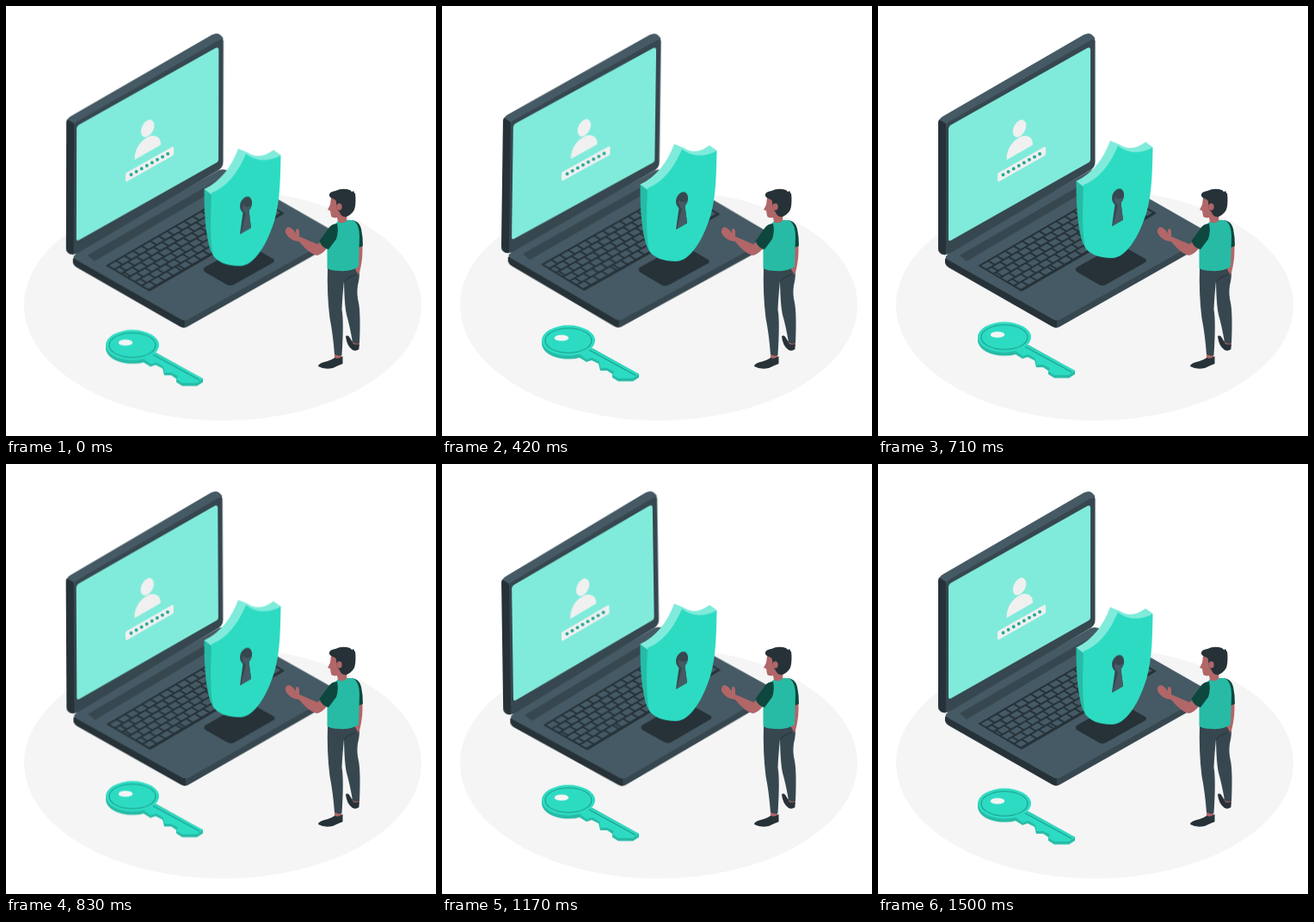
An HTML page without scripts that plays this animation: 500x500 px, repeating every 1.54 s.

```html
<!DOCTYPE html>
<html lang="en">
<head>
<meta charset="utf-8">
<title>Secure login</title>
<style>
  html, body { margin: 0; width: 100%; height: 100%; overflow: hidden; background: #fff; }
  svg { display: block; width: 100%; height: 100%; }

  .ink { fill: #263238; }
  .slate { fill: #37474f; }
  .steel { fill: #455a64; }
  .mint { fill: #80ebdb; }
  .teal { fill: #2ddbc3; }
  .shade { fill: #26bba6; }
  .pale { fill: #f0f0f0; }
  .skin { fill: #b16668; }
  .sleeve { fill: #0e473e; }
  .groove { fill: none; stroke: #1d9c89; stroke-width: 1.1; }
  .keys { fill: none; stroke: #455a64; stroke-width: 6; stroke-dasharray: 8 1.9; }
  .dots { fill: none; stroke: #25a894; stroke-width: 4; stroke-linecap: round; stroke-dasharray: 0 7; }

  .sway { transform-origin: 227px 203px; animation: sway 1540ms -50ms linear infinite; }
  .float { animation: float 1540ms -50ms linear infinite; }
  @keyframes sway {
    25% { transform: rotate(1deg); }
    75% { transform: rotate(-1deg); }
  }
  @keyframes float {
    50% { transform: translateY(-10px); }
  }
</style>
</head>
<body>
<svg viewBox="0 0 500 500">
  <ellipse cx="252" cy="347.800" rx="231" ry="134.200" fill="#f5f5f5"/>

  <g class="sway">
    <!-- base -->
    <path class="ink" d="M78 294V299Q79 302 82 304L203 373Q206 374.500 208 374V364L84 290Z"/>
    <path class="slate" d="M208 374Q210 374 213 372L382 276Q384 275 384 267L208 364Z"/>
    <path class="steel" d="M80 290L92 280L247 191Q254 188 261 193L382 262Q386 266 382 268.500L213 364Q208 367 203 364L81 295Q77 292.500 80 290Z"/>
    <path class="slate" d="M95 290L250 200L258 205L103 297Z"/>

    <!-- keyboard -->
    <g transform="matrix(1 -.58 1 .588 116 302)">
      <rect class="ink" width="157" height="51" rx="1"/>
      <g class="keys">
        <path d="M2 5H155M2 29H155"/>
        <path d="M2 13H155M2 37H155" stroke-dashoffset="4"/>
        <path d="M2 21H155" stroke-dashoffset="7"/>
        <path d="M2 45H42M44 45H88M90 45H155" stroke-dashoffset="1"/>
      </g>
    </g>
    <path class="ink" d="M231 304L277 278Q280 276 283 278L311 294Q313 296 311 298L265 324Q261 326 257 324L231 309Q229 306 231 304Z"/>

    <!-- lid -->
    <path class="steel" d="M70 138Q70 131 76 128L239 33.500Q247 29 252 37V181Q252 187 248 190L82 288Q76 291 72 287Q70 285 70 281Z"/>
    <path class="ink" d="M70 138Q70 134 71 132L79 137V289Q75 290 72 287Q70 285 70 281Z"/>
    <path class="slate" d="M79 141Q79 137 82 135L247 40Q251 38 252.500 40V181Q252.500 187 248 190L83 288Q79 290 79 286Z"/>
    <path class="mint" d="M82 143.500Q82 140 85 138.300L243 49Q247 47 247 51V178Q247 181 244 182.500L85 272.500Q82 274 82 271Z"/>

    <!-- login -->
    <ellipse class="pale" cx="164.500" cy="142.500" rx="6.800" ry="10.800" transform="rotate(27 164.500 142.500)"/>
    <path class="pale" d="M149.500 179C149 167 156 157 165 152.500C173 149 180 152 180 161.500Z"/>
    <path class="pale" d="M139 196Q139 194.500 141 193.500L193 164Q195 163 195 165V172Q195 173.500 193 174.500L141 204Q139 205 139 203Z"/>
    <path class="dots" d="M145.500 196.200L188.300 171.800"/>
  </g>

  <g class="float">
    <!-- shield -->
    <path class="shade" d="M230.500 213L243 213L262 302C249 299 240 294 236.500 281C231 259 230.500 236 230.500 213Z"/>
    <path class="mint" d="M230.500 213.500C250 204 262 188 270 166.500L281 171C291 178 302 175 311 168L319.500 174L300 185L239 220Z"/>
    <path class="teal" d="M239 218C257 211 270 194 279 172.500C291 182 307 182 319.500 174C319 198 319 226 312.500 249C304 277 289 303 272 303C256 303 246 298 241 291C237 272 238 240 239 218Z"/>
    <path class="slate" d="M275.500 241C271 237 271 230 275 225.500C279 220.500 285 221 286 228C286.500 232 285 236 282.500 238.500L285 258.500L272 266Z"/>
    <path class="steel" d="M279 242Q274 238 275 232Q281 236 285.500 232Q285 236 282.500 238.500L285 258.500L273 265.500Z"/>
  </g>

  <g class="float">
    <!-- key -->
    <path class="shade" d="M116 395V399C117 410 132 417 148 416.500Q155 416.500 160 415L168 420L174 418L182 422L184 430L192 430L198 434V438L205 442.500H222L229 438V434L175 404Z"/>
    <path class="teal" d="M173 404L229 434L222 439H205L198 435L200 431L192 427H184L183 420L175 415L168 417L160 411Z"/>
    <ellipse class="teal" cx="147" cy="395" rx="31" ry="17.700"/>
    <ellipse class="groove" cx="147" cy="395" rx="27" ry="14.300"/>
    <path class="groove" d="M171 406L225 435.500"/>
    <ellipse cx="139" cy="392" rx="8.300" ry="3.600" fill="#f5f5f5"/>
  </g>

  <!-- man -->
  <path class="skin" d="M382 404H390V411H382ZM402 389H411V396H403Z"/>
  <path class="ink" d="M382 409Q387 411 391.500 407V416Q386 418 380 421Q370 423 363 419Q363 416 370 414Q378 412 382 409ZM395 384Q398 382 400 386L404 393Q407 394 410.500 393V399Q407 402 403 400Q396 395 395 384Z"/>
  <path class="slate" d="M374 304H411Q411.500 316 409 325Q407.500 335 410 345Q412.500 358 411 392Q407 394 403 391Q400 373 396 359Q393.500 348 393 320Q391 340 390.500 353Q393 366 390.500 406Q387 408 382 405Q380 380 376.500 363Q373 335 374 304Z"/>
  <path d="M393.500 321Q395 316 407 312" fill="none" stroke="#263238"/>
  <path class="skin" d="M410 278H414.500Q415 293 412 306L410 313L406 306Z"/>
  <path class="sleeve" d="M402 249Q411 250 413 259Q415 268 415 279L410 281L406 265Z"/>
  <path class="skin" d="M370 272L373 282Q366 290 361 290Q351 287 341 274Q330 273 325 264Q324 259 328 257Q332 257 337 264L337 260Q340 257 341 262L341 268L362 277Z"/>
  <path fill="#27bba6" d="M385 251Q396 247 405 250Q411 255 411 268L410 303Q402 309 388 308Q378 308 373.500 305V278Q376 262 385 251Z"/>
  <path class="sleeve" d="M385 253Q378 253 374 260L364.500 273Q367 281 375 283L384 271Q387 262 385 253Z"/>
  <path class="skin" d="M378 223L394 221L397 236L396 250Q391 254 386 251L385 246Q379 247 378 244L377 238L374 237L377 231Z"/>
  <path class="ink" d="M376 221Q375 216 383 215Q391 211 400 214Q404 218 406 218Q407 225 406 233Q405 241 396 245Q390 246 388 240L385 236L384 228Q384 225 380 224Q377 223 376 221ZM401 217L404 215L406 219Z"/>
  <ellipse class="skin" cx="387.500" cy="233.500" rx="3.200" ry="4"/>
</svg>
</body>
</html>
```
